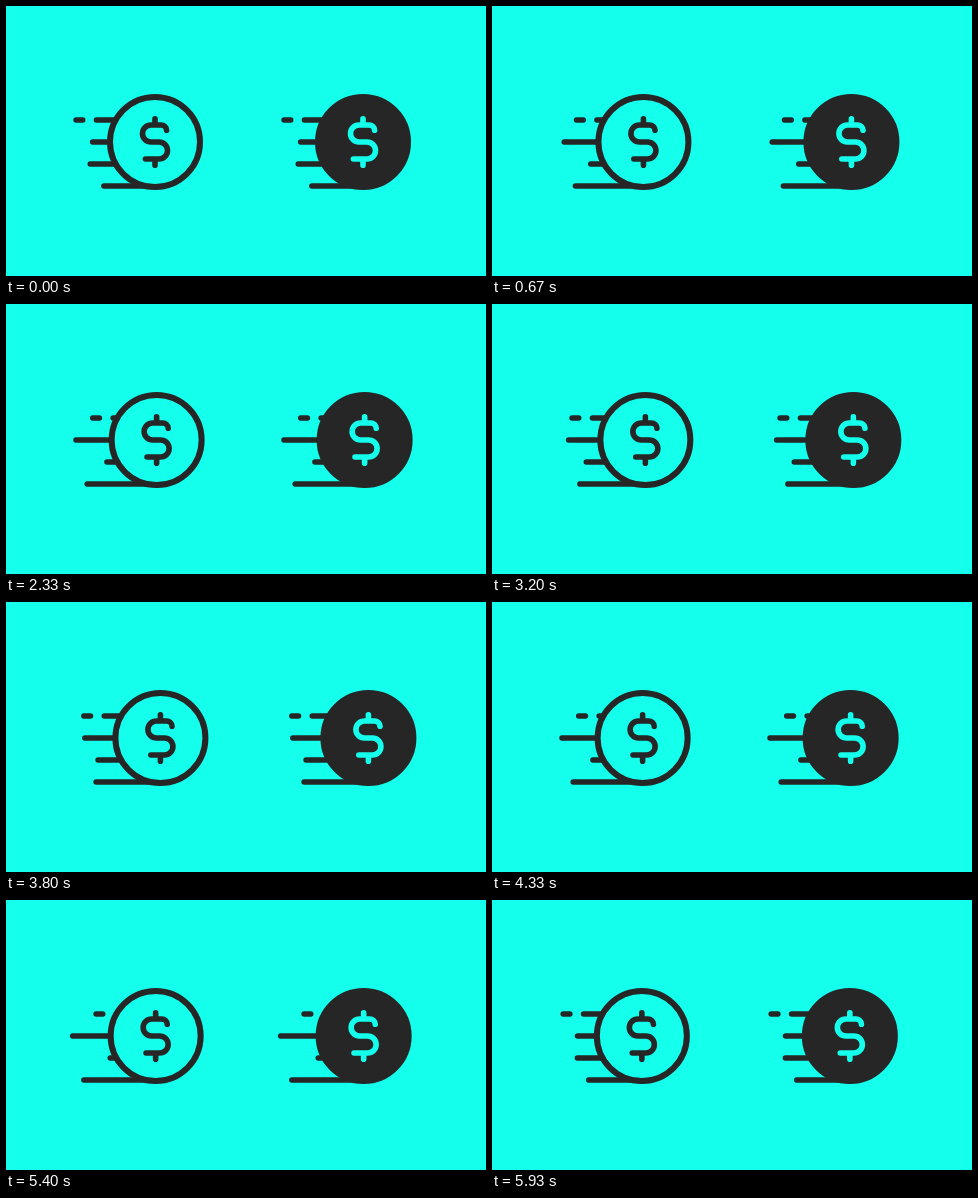
Recreate the animation shown at these times as an HTML page. Size 480x270 px, loop 5.99 s.

```html
<!DOCTYPE html>
<html lang="en">
<head>
<meta charset="utf-8">
<title>Fast coin</title>
<style>
  html, body { margin: 0; width: 100%; height: 100%; overflow: hidden; background: #14ffec; }
  svg { display: block; width: 100vw; height: 100vh; }
  .ink { fill: none; stroke: #262626; stroke-width: 5.6; stroke-linecap: round; stroke-linejoin: round; }
</style>
</head>
<body>
<svg viewBox="0 0 480 270">
  <defs>
    <path id="dollar" d="M0-23.3V-17M0 17V23.3M11.6-11.8A5.6 5.2 0 0 0 6-17H-4A8.5 8.5 0 0 0-4 0H4A8.5 8.5 0 0 1 4 17H-9.6"/>
    <path id="trails" class="ink"/>
  </defs>
  <g>
    <use href="#trails"/>
    <g class="coin ink">
      <circle r="45" fill="#14ffec" stroke-width="6"/>
      <use href="#dollar"/>
    </g>
  </g>
  <g transform="translate(208)">
    <use href="#trails"/>
    <g class="coin ink">
      <circle r="45" fill="#262626" stroke-width="6"/>
      <use href="#dollar" stroke="#14ffec"/>
    </g>
  </g>
</svg>
<script>
const LOOP = 5990, STEP = 200 / 3, CYCLE = 1000, TRAVEL = 25;
const trails = document.getElementById('trails');
const coins = document.querySelectorAll('.coin');

// Back-and-forth progress at constant speed, 0 to 1 to 0
function pingPong(ms) {
  const phase = (ms / CYCLE + 0.022) % 1;
  return 1 - Math.abs(1 - 2 * phase);
}

// The coin darts right, then drifts back
function coinShift(p) {
  const start = 0.06, peak = 0.2, reach = 7.5;
  if (p < peak) {
    const u = Math.max(0, (p - start) / (peak - start));
    return reach * u * u * (3 - 2 * u);
  }
  return reach * ((1 - p) / (1 - peak)) ** 1.5;
}

const line = (x1, x2, y) => x1 < x2 ? `M${x1} ${y}H${x2}` : '';

function draw(ms) {
  const p = pingPong(ms), slide = p * TRAVEL;
  const cx = 149 + coinShift(p), edge = cx - 36;
  trails.setAttribute('d',
    line(69 + slide, 75.6 + slide, 114) +
    line(89.4 + slide, edge, 114) +
    line(87.8 - slide, edge, 136) +
    line(83.2 + slide, edge, 158) +
    line(99 - slide, cx, 180));
  for (const coin of coins) coin.setAttribute('transform', `translate(${cx} 136)`);
}

function tick() {
  const t = performance.now() % LOOP;
  draw(Math.floor((t + 3.4) / STEP) * STEP);
  requestAnimationFrame(tick);
}
// Colours come from attributes, so lift the class defaults where one is set
document.querySelectorAll('.coin circle, .coin use[stroke]').forEach(el => {
  for (const name of ['fill', 'stroke']) {
    if (el.hasAttribute(name)) el.style[name] = el.getAttribute(name);
  }
});
tick();
</script>
</body>
</html>
```
